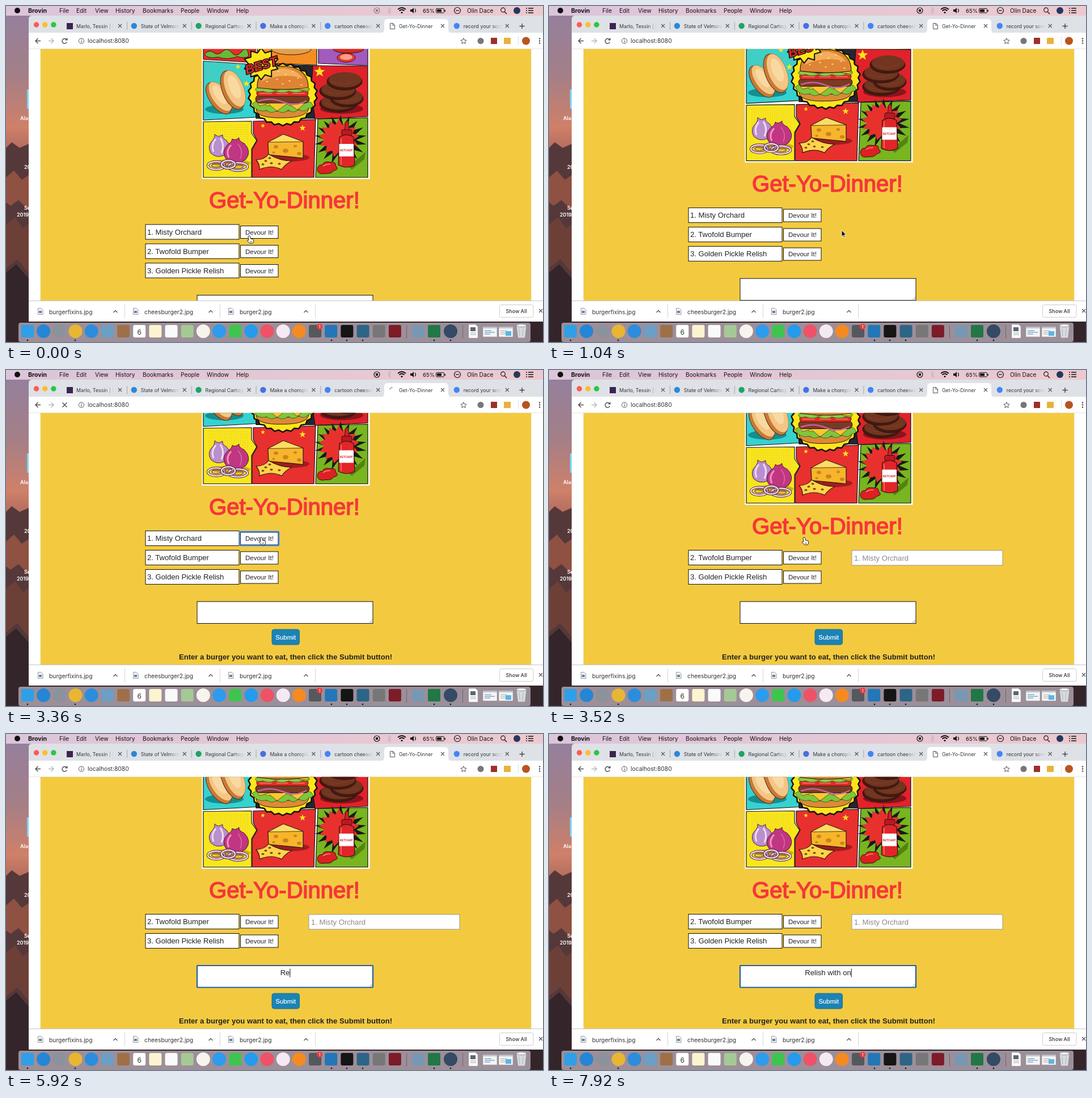
Write an HTML page that moves like this. It is 947x592 px and loops after 8000 ms.

```html
<!DOCTYPE html>
<html lang="en">
<head>
<meta charset="utf-8">
<title>Burger list</title>
<style>
html, body { margin: 0; width: 100%; height: 100%; overflow: hidden; }
svg { display: block; width: 947px; height: 592px; font-family: Inter, "Open Sans", sans-serif; }
.page { font-family: "Liberation Sans", Arial, sans-serif; }
text { white-space: pre; }
</style>
</head>
<body>
<svg id="stage" viewBox="0 0 947 592"></svg>
<script>
const T = (x, y, s, size, fill = '#222', more = '') =>
  `<text x="${x}" y="${y}" font-size="${size}" fill="${fill}" ${more}>${s}</text>`;
const R = (x, y, w, h, fill, more = '') =>
  `<rect x="${x}" y="${y}" width="${w}" height="${h}" fill="${fill}" ${more}/>`;
const E = (x, y, rx, ry, fill, more = '') =>
  `<ellipse cx="${x}" cy="${y}" rx="${rx}" ry="${ry}" fill="${fill}" ${more}/>`;
const C = (x, y, r, fill, more) => E(x, y, r, r, fill, more);
const P = (d, fill = 'none', more = '') => `<path d="${d}" fill="${fill}" ${more}/>`;
const G = (id, s, more = '') => `<g id="${id}" ${more}>${s}</g>`;
const ink = (w = 1, c = '#2a1515') => `stroke="${c}" stroke-width="${w}" stroke-linejoin="round"`;
const turn = (a, x, y) => `transform="rotate(${a} ${x} ${y})"`;

// star or jagged burst
function burst(x, y, n, rx, ry, inner, fill, more) {
  let d = 'M';
  for (let i = 0; i < 2 * n; i++) {
    const a = i * Math.PI / n - Math.PI / 2, k = i % 2 ? inner : 1;
    d += `${(x + rx * k * Math.cos(a)).toFixed(1)} ${(y + ry * k * Math.sin(a)).toFixed(1)} `;
  }
  return P(d + 'Z', fill, more);
}
const star = (x, y, r) => burst(x, y, 5, r, r, .42, '#ffe11f');

function desktop() {
  return R(0, 0, 947, 592, 'url(#sky)') +
    P('M0 250L10 240 24 250 40 243V592H0Z', '#54383a') +
    P('M0 302L14 290 28 306 40 298V360L22 342 8 352 0 346Z', '#8e5142') +
    P('M0 385L16 372 30 392 40 384V470L20 446 0 462Z', '#6d4037') +
    P('M0 470L18 455 40 480V540H947V592H0Z', '#33252a') +
    R(37, 147, 4, 34, '#7fd3f2') +
    [[25, 201, 'Ala'], [32, 287, '20'], [32, 359, 'Se'], [19, 371, '2019']].map(([x, y, s]) =>
      T(x, y, s, 9, '#fff', 'font-weight="600"')).join('');
}

function menuBar() {
  const items = [[94, 'File'], [124, 'Edit'], [157, 'View'], [193, 'History'], [241, 'Bookmarks'],
    [308, 'People'], [354, 'Window'], [406, 'Help']];
  const line = 'stroke="#111" stroke-width="1.2"';
  return R(0, 0, 947, 17, 'url(#bar)') + C(20, 8, 5, '#111') +
    T(39, 12, 'Brovin', 10.6, '#111', 'font-weight="700"') +
    items.map(([x, s]) => T(x, 12, s, 10.2, '#111')).join('') +
    G('rec', C(654, 8, 5, 'none', line) + R(652, 6, 4, 4, '#111')) +
    P('M673 5l6 6-3 3V2l3 3-6 6', 'none', 'stroke="#c5adb7"') +
    P('M691 6q7-6 14 0M693.5 8.5q4.5-4 9 0', 'none', 'stroke="#111" stroke-width="1.7"') + C(698, 11.5, 1.6, '#111') +
    P('M713 6h3l3-3v10l-3-3h-3Z', '#111') + P('M721 5q3 3 0 6', 'none', line) +
    T(735, 12, '65%', 9.6, '#111') +
    R(758.5, 4.5, 14, 7.5, 'none', 'rx="1.5" stroke="#111"') + R(760, 6, 8, 4.5, '#111') + R(773.5, 7, 1.5, 3, '#111') +
    C(796, 8, 5.5, 'none', line) + P('M793 8h6', 'none', line) +
    T(813, 12, 'Olin Dace', 10.2, '#111') +
    C(876.5, 7, 3.8, 'none', line) + P('M879 10l4 4', 'none', line) +
    C(901, 8, 6, '#26375e') + P('M917 4h2m2 0h9M917 8h2m2 0h9M917 12h2m2 0h9', 'none', 'stroke="#111" stroke-width="1.5"');
}

function tabStrip() {
  const tabs = [['Marlo, Tessin | P', '#3d2350'], ['State of Velmore', '#2a88d8'], ['Regional Cartog', '#1fa463'],
    ['Make a choroplet', '#4a6fe0'], ['cartoon cheeseb', '#4285f4'], ['Get-Yo-Dinner'], ['record your scre', '#4285f4']];
  let s = P('M40 556V23q0-6 6-6H947V556Z', '#dee1e6') +
    ['#ff5b52', '#fdbc2f', '#28c840'].map((c, i) => C(53.5 + 15.2 * i, 33, 4.7, c)).join('') +
    P('M660 48q7 0 7-7V29q0-6 6-6H774q6 0 6 6V41q0 7 7 7Z', '#fff');
  tabs.forEach(([name, c], i) => {
    const x = 112 + 113.8 * i;
    if (i == 5) s += G('doc', P('M677.5 30.5h5l3 3v7h-8Z M682 30.5v3.5h3.5', '#fff', 'stroke="#555"'));
    else s += i == 0 ? R(x - 5, 30, 11, 11, c) : C(x, 35, 5.2, c);
    s += `<svg x="${x + 12}" y="24" width="66" height="22">${T(0, 14.6, name, 8.8, '#33373b')}` +
      (i == 5 ? '' : R(50, 0, 16, 22, 'url(#fade)')) + '</svg>' +
      P(`M${x + 86} 32l6 6m0-6l-6 6`, 'none', 'stroke="#555" stroke-width="1.1"');
    if (i < 4) s += R(x + 101, 28, 1, 14, '#a3a7ad');
  });
  return s + G('spin', P('M681 31a4 4 0 0 1 4 4', 'none', 'stroke="#777" stroke-width="1.3"')) +
    P('M905.5 35.5h9m-4.5-4.5v9', 'none', 'stroke="#444" stroke-width="1.4"');
}

function toolbar() {
  const line = c => `stroke="${c}" stroke-width="1.4"`;
  return R(40, 47, 907, 28.5, '#fff') + R(40, 75, 907, .7, '#d0d0d0') +
    P('M61 61.5H52m4.5-4.5l-4.5 4.5 4.5 4.5', 'none', line('#4a4d51')) +
    P('M75 61.5h9m-4.5-4.5l4.5 4.5-4.5 4.5', 'none', line('#b5b7ba')) +
    G('reload', P('M107 59.5a4.3 4.3 0 1 0 .3 4', 'none', line('#4a4d51')) + P('M108.5 56v4.5H104Z', '#4a4d51')) +
    G('stop', P('M99.5 57.5l8 8m0-8l-8 8', 'none', line('#4a4d51'))) +
    C(133, 61.5, 4.6, 'none', 'stroke="#555"') + P('M133 61v3.2M133 58.6v1.2', 'none', 'stroke="#555" stroke-width="1.2"') +
    T(144, 65.3, 'localhost:8080', 10.3, '#303236') +
    burst(807, 62, 5, 5.5, 5.5, .46, 'none', 'stroke="#555"') +
    C(837, 61.5, 5.5, '#777') + R(855, 56, 11, 11, '#9d2f2d') + R(878, 56, 12, 11, '#e8b23c') +
    R(903, 54, 1, 15, '#ddd') + C(917, 61.5, 7, '#b9541f') +
    [57.5, 61.5, 65.5].map(y => C(941, y, 1.2, '#444')).join('');
}

function buns() {
  const bun = (x, y, rx, ry, a) => `<g ${turn(a, x, y)}>` + E(x - 3, y + 1, rx, ry, '#c97a35', ink(1, '#5a2d12')) +
    E(x + 1, y, rx - 2, ry - 2, '#f5c583', ink(.5, '#a05c22')) + E(x + 2, y - 3, rx * .5, ry * .6, '#f9d9a2') + '</g>';
  return E(385, 182, 34, 8, '#148e91') + bun(377, 160, 16, 32, -35) + bun(402, 146, 18, 36, -22);
}

function burger() {
  return P('M441 182Q487 190 534 180 532 197 487 197 443 198 441 182Z', '#dd8a36', ink()) +
    P('M434 172q10-8 20 0t20 0 20 0 20 0 24-2q8 9-4 10-8 9-18 2-9 9-18 1-10 9-20 1-10 7-18 0-18 5-26-12Z', '#7fc63c', ink(.8, '#2d5a1b')) +
    P('M441 167L534 165 514 183 497 171 478 185 462 172 447 176Z', '#fbc72e', ink(.6)) +
    R(440, 157, 95, 14, '#793b22', 'rx="7" ' + ink()) +
    P('M444 168q22-8 44 1t42-2', 'none', 'stroke="#c65fa4" stroke-width="2.5"') +
    R(442, 148, 91, 11, '#e32b27', 'rx="5" ' + ink(.8)) +
    P('M447 154h22m8 0h20m8 0h22', 'none', 'stroke="#f9836b" stroke-width="1.5"') +
    P('M440 146q12-8 24-1t24 0 24 0 23 0q2 7-12 5-12 5-24 0-12 6-24 0-12 5-22 0-14 3-13-4Z', '#8bcb43', ink(.8, '#2d5a1b')) +
    P('M443 144Q442 106 488 106 533 107 533 144 490 150 443 144Z', '#df8434', ink(1.2)) +
    P('M450 133Q457 110 490 110 515 113 524 128 489 116 450 133Z', '#f2ae58') +
    [[467, 121], [480, 115], [493, 121], [506, 116], [515, 127], [478, 129], [500, 132], [460, 133], [488, 137], [521, 139]]
      .map(([x, y]) => E(x, y, 1.7, 1, '#ffe2a1')).join('');
}

function patties() {
  return E(592, 181, 38, 9, '#8b141b') + [[586, 169, 33], [601, 160, 29], [585, 147, 32], [597, 130, 31]].map(([x, y, r]) =>
    E(x, y + 3, r, 15, '#45190f', ink()) + E(x + 1, y, r - 2, 13.5, '#713520') +
    P(`M${x - 22} ${y + 3}q22 10 44-2`, 'none', 'stroke="#985333" stroke-dasharray="2 3"')).join('');
}

function onions() {
  const ring = (x, y, rx) => E(x, y, rx, 7, 'none', ink(4.5, '#4d2246')) + E(x, y, rx, 7, 'none', ink(2.6, '#ead4e6')) +
    E(x, y, rx * .55, 3, 'none', ink(1.4, '#843f79'));
  return E(397, 277, 34, 7, '#cfae17') +
    P('M368 226q6 5 9 3l5-2q-1 6 7 10 13 14-4 26-14 6-24-4-7-13 4-23 4-4 3-10Z', '#b98fce', ink(1, '#4d2246')) +
    P('M370 234q-9 10-4 23M378 233q8 12 2 26', 'none', 'stroke="#eed9f3" stroke-width="3"') +
    P('M399 234q5 4 12-2-1 6 9 10 14 14 3 28-14 12-33 2-13-15 2-29 6-3 7-9Z', '#c03682', ink(1, '#4d1738')) +
    P('M397 245q-10 10-4 22', 'none', 'stroke="#ec93c1" stroke-width="3"') + P('M409 243q10 12 4 26', 'none', 'stroke="#dc6ba4" stroke-width="1.5"') +
    ring(371, 281, 15) + ring(409, 283, 17) + ring(392, 279, 12);
}

function cheese() {
  return E(500, 267, 35, 7, '#9f1d1d') +
    P('M462 240L489 226 524 239V268L463 262Z', '#f6b52b', ink(1.2)) + P('M462 240L489 226 524 239Z', '#ffdc61', ink(.8)) +
    [[476, 248, 4], [493, 255, 5], [510, 247, 3], [517, 260, 4], [472, 258, 2.5]].map(([x, y, r]) => E(x, y, r, r * .75, '#ce841b')).join('') +
    P('M441 271Q456 271 463 261 483 273 504 273 493 278 486 288 468 279 447 288 448 279 441 271Z', '#ffd449', ink(1.2)) +
    [[458, 273], [468, 277], [482, 278], [465, 268], [453, 279]].map(([x, y]) => E(x, y, 2.5, 1.7, '#7c4716')).join('');
}

function ketchup() {
  return burst(590, 236, 18, 46, 44, .6, '#171a16') + burst(587, 233, 13, 36, 34, .72, '#e8312d') +
    P('M604 283L634 257 632 270 610 288Z', '#54830f') +
    P('M597 222L599 204Q601 201 603 204L606 222Z', '#d81f24', ink(1)) +
    R(592, 218, 18, 10, '#bd1820', 'rx="2" ' + ink(1)) +
    P('M588 231Q600 223 613 231L615 280Q601 288 586 280Z', '#e12529', ink(1.2)) +
    P('M591 233v47', 'none', 'stroke="#ff7a70" stroke-width="1.5"') +
    R(587.5, 243, 25.5, 22, '#fff') + T(600, 256, 'KETCHUP', 4.7, '#d81f24', 'text-anchor="middle" font-weight="800"') +
    P('M549 288q1-9 9-8 2-7 13-5 12-1 10 6 8 7-3 9-4 6-14 5-14 3-15-7Z', '#dd2023', ink(1)) +
    P('M559 282q7-4 13-3', 'none', 'stroke="#ff8a80" stroke-width="1.5"');
}

function poster() {
  const frame = ink(1.2, '#111');
  return R(345.5, 60, 296, 245, '#fff') +
    P('M348 60H440V100L348 94Z', '#e52c2b', frame) + P('M350 85q8-9 16-3t16-2 16 2 18-2 12 9q-9 4-20 0-18 7-34 1-18 4-24-5Z', '#6ab936', ink(1)) +
    P('M443 60H548V104L443 100Z', '#f58e22', frame) + E(503, 76, 35, 10, '#e2a04e', ink(1)) +
    P('M551 60H638V105L551 101Z', '#a35abd', frame) + E(604, 76, 27, 7, '#d92924', ink(1)) + E(600, 91, 16, 8, '#e83b30', ink(1)) + E(600, 90, 11, 5, '#f7a08a') +
    P('M348 97L437 103 441 196 348 201Z', '#36d2cf', frame) + P('M348 97L437 103 441 140 348 140Z', 'url(#dots)') + buns() +
    star(424, 137, 6) + star(409, 107, 5) +
    P('M440 102L541 105 545 198 441 198Z', '#252630', frame) +
    P('M541 105L638 106V195L545 199 538 150Z', '#e1222a', frame) + star(553, 116, 10) + patties() +
    P('M348 204L433 203V224L442 237 433 252V302H348Z', '#f8e61d', frame) + R(355, 207, 72, 55, 'url(#dots)') + onions() +
    P('M436 203L546 200 543 302H434V253L443 237 436 224Z', '#e8302e', frame) + star(523, 215, 6) + star(453, 211, 4) + cheese() +
    P('M550 199L638 197V302H546Z', '#78b51f', frame) + ketchup() +
    burst(488, 156, 26, 61, 55, .94, '#ffe51a', ink(2.5, '#111')) + burger() +
    burst(450, 102, 10, 31, 28, .72, '#ffe51a', ink(2, '#111')) +
    T(450, 112, 'BEST', 22, '#e8252a', 'text-anchor="middle" font-weight="800" font-style="italic" paint-order="stroke" stroke="#111" stroke-width="3" ' + turn(-17, 450, 104));
}

function burgerRow(i, name) {
  const y = 385 + 34 * i;
  return G('row' + i, R(246, y, 165, 26, '#fff', 'stroke="#111"') + T(249, y + 17.5, `${i + 1}. ${name}`, 13.1) +
    R(413.5, y + 2.5, 66.5, 22, '#fff', 'stroke="#111"') + T(422, y + 17.5, 'Devour It!', 11.5));
}

function page() {
  return R(40, 75.7, 907, 444, '#fff') + R(61, 75.7, 865, 444, '#f3ca3f') +
    P('M61 76V519M926 76V519', 'none', 'stroke="#d9c68a" stroke-dasharray="1 1"') +
    '<g class="page" clip-path="url(#view)">' +
    G('head', poster() + T(358, 356, 'Get-Yo-Dinner!', 40.1, '#f6363a', 'stroke="#f6363a" stroke-width="1.5"')) +
    G('list', burgerRow(0, 'Misty Orchard') + burgerRow(1, 'Twofold Bumper') + burgerRow(2, 'Golden Pickle Relish') +
      G('ring', R(412.5, 386.5, 68.5, 24, 'none', 'rx="1" stroke="#2f76c9" stroke-width="2"') +
        R(411.2, 385.2, 71, 26.6, 'none', 'rx="2" stroke="#8fb4d8"')) +
      G('eaten', R(534, 419.5, 266, 26, '#fff', 'stroke="#999"') + T(538, 437, '1. Misty Orchard', 13.1, '#8a8a8a')) +
      R(337, 509.5, 310, 38.5, '#fff', 'stroke="#111"') + P('M641 546.5l5-5M644 546.5l2-2', 'none', 'stroke="#888" stroke-width=".8"') +
      G('focus', R(337, 509.5, 310, 38.5, 'none', 'rx="1" stroke="#285f9f" stroke-width="2.2"')) +
      T(492, 526.5, '', 13.1, '#222', 'id="typed" text-anchor="middle"') + G('caret', R(0, 515, 1, 15, '#111')) +
      R(469, 558.5, 48.5, 27, '#1c83b5', 'rx="4" stroke="#15709c"') +
      T(493.2, 576, 'Submit', 11.5, '#fff', 'text-anchor="middle" stroke="#fff" stroke-width=".2"') +
      T(493, 611.5, 'Enter a burger you want to eat, then click the Submit button!', 13.1, '#222', 'text-anchor="middle" font-weight="700"')) +
    '</g>';
}

function shelf() {
  return R(40, 519.5, 907, 36.5, '#fff') + R(40, 519, 907, 1, '#c6c6c6') +
    ['burgerfixins.jpg', 'cheesburger2.jpg', 'burger2.jpg'].map((s, i) => {
      const x = 168 * i;
      return P(`M${x + 56.5} 532.5h5.5l3 3v8h-8.5Z`, '#f4f4f4', 'stroke="#999"') + R(x + 58, 537, 5, 4, '#6482a8') +
        T(x + 76, 543, s, 10.3, '#333') + P(`M${x + 189.5} 540l3.5-3.5 3.5 3.5`, 'none', 'stroke="#555" stroke-width="1.3"') +
        R(x + 209, 526, 1, 24, '#d5d5d5');
    }).join('') +
    R(870.5, 526.5, 59.5, 22, '#fff', 'rx="3" stroke="#ccc"') +
    T(900, 541, 'Show All', 8.9, '#333', 'text-anchor="middle" font-weight="500"') +
    P('M940 534l6 6m0-6l-6 6', 'none', 'stroke="#555" stroke-width="1.2"');
}

function dock() {
  const apps = ('#2f9fe8 o#2586d5 o#8b929b o#e9b634 o#2c8ddd #6b9fc5 #9f7048 #fff #fcf3d0 #fafafa #a5c995 o#f7f4f0 ' +
    'o#2d9bee #3ec54f o#249bec o#ef5266 o#f5eaf4 o#f58a20 #55585d #2377b8 #151515 #2d6587 #777 #7d1c28').split(' ');
  const dots = [38, 122, 574, 601, 629, 755, 784];
  const mini = (x, c) => R(x - 12, 565, 25, 18, '#f5f5f5', 'stroke="#999" stroke-width=".6"') + R(x - 12, 565, 25, 3, '#bfc4cc') +
    P(`M${x - 9} 572h12m-12 3h18m-18 3h10`, 'none', `stroke="${c}"`);
  return R(22, 558, 903, 34, '#9c8f99', 'rx="4"') +
    apps.map((c, i) => {
      const x = 38 + 28.17 * i;
      return c[0] == 'o' ? C(x, 573, 12, c.slice(1)) : R(x - 11, 562, 22, 22, c, 'rx="3"');
    }).join('') +
    T(235.2, 579, '6', 12, '#333', 'text-anchor="middle"') +
    C(553, 565, 5, '#f0383a') + T(553, 567.8, '1', 7.5, '#fff', 'text-anchor="middle"') +
    R(706, 562, 1, 24, '#71666d') + R(805, 562, 1, 24, '#71666d') +
    R(716, 563, 22, 21, '#7798b4') + R(744, 562, 22, 22, '#217846', 'rx="2"') + C(784, 573, 12, '#344a65') +
    P('M816 561h12l4 4v20h-16Z', '#fff', 'stroke="#aaa" stroke-width=".6"') + R(819, 566, 9, 7, '#5d6670') + P('M819 576h10m-10 3h10', 'none', 'stroke="#999"') +
    mini(853, '#4c82bb') + mini(881, '#aaa') + R(881, 573, 10, 8, '#5bb5e5') +
    P('M900 563H918L915.5 585H902.5Z', '#d9dcdf', 'stroke="#8e9398"') + E(909, 563, 9, 2.5, '#f5f5f5', 'stroke="#8e9398"') +
    P('M905 568l1 14m6-14l-1 14', 'none', 'stroke="#b0b5b9"') +
    dots.map(x => C(x, 589, 1.3, '#111')).join('');
}

const cursors = G('arrow', P('M0 0V11.5L2.7 9 4.5 13 6.3 12.2 4.5 8.3H8Z', '#111', 'stroke="#fff" stroke-width=".9"')) +
  G('hand', P('M-1 0Q1-1 1.5 1L2.5 5 7 6Q8 7 7.5 11L6 13H1L-4 8.5Q-3.5 6.5-1 8L-2 1Z', '#fff', 'stroke="#111" stroke-width=".9"') +
    P('M2 9v2.5m2-2.5v2.5', 'none', 'stroke="#111" stroke-width=".7"')) +
  G('beam', P('M-2.5-6Q0-6 0-4 0-6 2.5-6M0-4V5M-2.5 6Q0 6 0 4 0 6 2.5 6', 'none', 'stroke="#111"'));

const stage = document.getElementById('stage');
stage.innerHTML = `<defs>
  <linearGradient id="sky" x2="0" y2="1"><stop stop-color="#93809f"/><stop offset=".2" stop-color="#a37f88"/><stop offset=".36" stop-color="#cf8069"/><stop offset=".45" stop-color="#a9655a"/></linearGradient>
  <linearGradient id="bar"><stop stop-color="#dcc5da"/><stop offset="1" stop-color="#ecc9cf"/></linearGradient>
  <linearGradient id="fade"><stop stop-color="#dee1e6" stop-opacity="0"/><stop offset="1" stop-color="#dee1e6"/></linearGradient>
  <pattern id="dots" width="4" height="4" patternUnits="userSpaceOnUse"><circle cx="2" cy="2" r=".8" fill="#d99a2a" opacity=".55"/></pattern>
  <clipPath id="view"><rect x="61" y="75.7" width="865" height="443.5"/></clipPath>
</defs>` + desktop() + tabStrip() + toolbar() + page() + shelf() + dock() + menuBar() + G('mouse', cursors);

const $ = id => document.getElementById(id);
const show = (id, on) => $(id).setAttribute('display', on ? 'inline' : 'none');
const move = (id, x, y) => $(id).setAttribute('transform', `translate(${x} ${y})`);
const ease = (t, from, to) => {
  const k = Math.min(1, Math.max(0, (t - from) / (to - from)));
  return k * k * (3 - 2 * k);
};

const LOOP = 8000, STEP = 80, RELOADED = 3440, FOCUS = 4640, TYPING = 5510;
const PHRASE = 'Relish with on';
const moves = [[200, 720, 516, 395], [2080, 2880, 450, 295], [3840, 4480, 470, 426]];

function pointer(t) {
  let x = 429, y = 405;
  for (const [from, to, tx, ty] of moves) {
    const k = ease(t, from, to);
    x += (tx - x) * k;
    y += (ty - y) * k;
  }
  return [x, y];
}

function draw(t) {
  const scroll = -101.5 * ease(t, 791, 1491);
  const reloaded = t >= RELOADED, loading = t >= 3200 && !reloaded;
  move('list', 0, scroll);
  move('head', 0, scroll + (reloaded ? 34 : 0));
  show('row0', !reloaded);
  show('eaten', reloaded);
  show('ring', t >= 3040 && !reloaded);
  show('reload', !loading);
  show('stop', loading);
  show('doc', !loading);
  show('spin', loading);
  $('spin').setAttribute('transform', `rotate(${t * .36 - 1290} 681 35)`);
  $('rec').setAttribute('opacity', t < 400 ? .4 : 1);

  const [x, y] = pointer(t);
  const overButton = x > 413 && x < 480 && [0, 1, 2].some(i => Math.abs(y - 398.5 - scroll - 34 * i) < 12 && !(reloaded && !i));
  const hand = overButton || (reloaded && t <= 3840);
  const beam = !hand && reloaded && y > 409;
  move('mouse', x, y);
  show('mouse', t < TYPING);
  show('hand', hand);
  show('beam', beam);
  show('arrow', !hand && !beam);

  const typed = PHRASE.slice(0, Math.max(0, Math.floor((t - TYPING) / 165)));
  $('typed').textContent = typed;
  show('focus', t >= FOCUS);
  show('caret', t >= TYPING || (t >= FOCUS && (t - FOCUS) % 1000 < 500));
  move('caret', 492 + $('typed').getComputedTextLength() / 2, 0);
}

function tick() {
  draw(Math.floor(performance.now() % LOOP / STEP) * STEP);
  requestAnimationFrame(tick);
}
tick();
</script>
</body>
</html>
```
